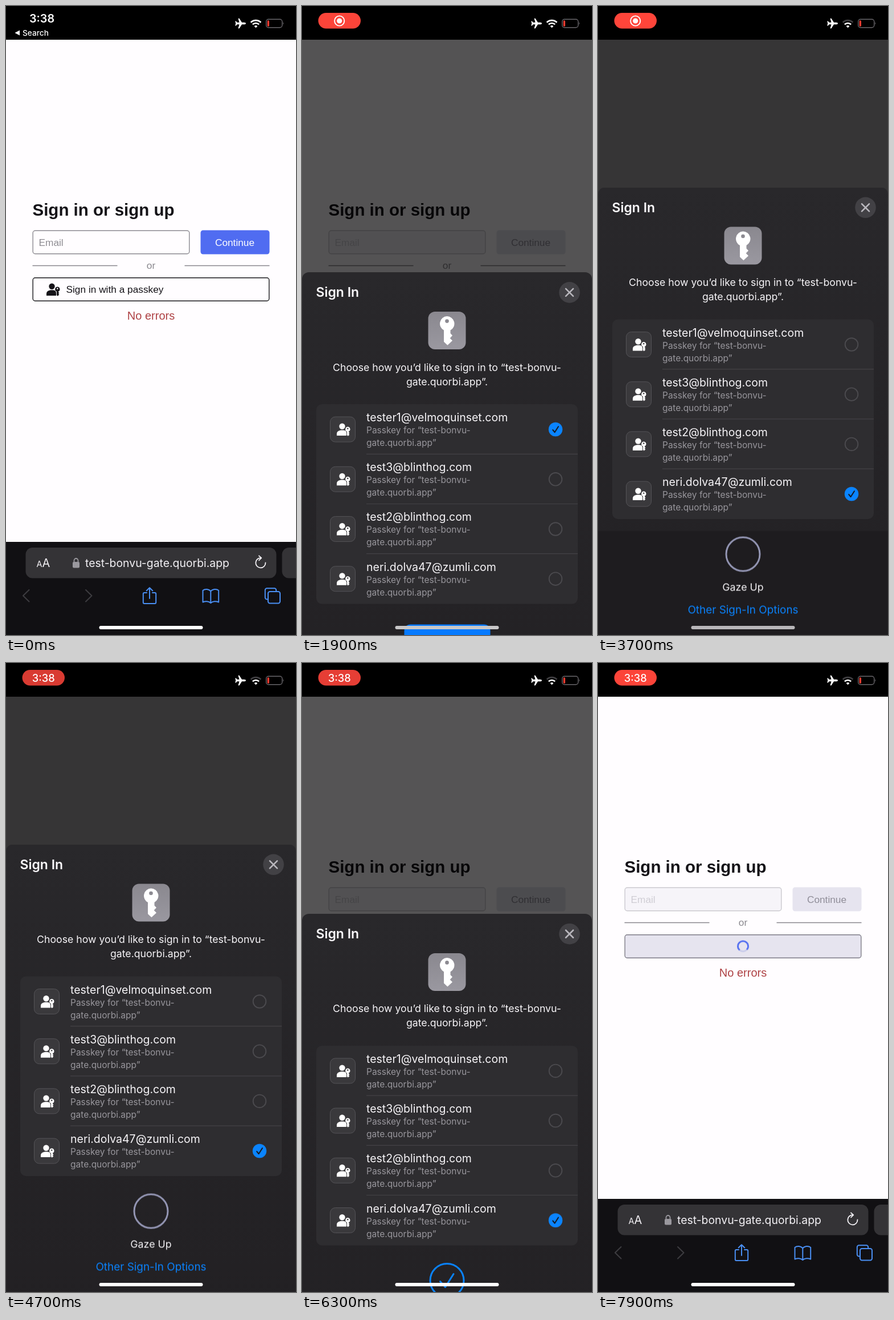
Recreate the animation shown at these times as an HTML page. Size 509 by 1101 pixels, loop 8000 ms.

```html
<!DOCTYPE html>
<html lang="en">
<head>
<meta charset="utf-8">
<title>Passkey sign-in</title>
<style>
html, body { margin: 0; width: 100%; height: 100%; overflow: hidden; background: #000; }
svg { display: block; width: 100%; height: 100%; font-family: Inter, sans-serif; }
.web { font-family: "Liberation Sans", Arial, sans-serif; }
.mid { text-anchor: middle; }
.line { fill: none; stroke-linecap: round; stroke-linejoin: round; }

/* Hard switches: .off leaves and .on arrives at the step */
.off { --a: 1; --b: 0; }
.on { --a: 0; --b: 1; }
.rec, .tap, .pick, .scan, .clock, .done { animation: 8s step-end infinite; }
.rec { animation-name: rec; }
.tap { animation-name: tap; }
.pick { animation-name: pick; }
.scan { animation-name: scan; }
.clock { animation-name: clock; }
.done { animation-name: done; }
@keyframes rec { 0% { opacity: var(--a) } 3.75%, 100% { opacity: var(--b) } }
@keyframes tap { 0% { opacity: var(--a) } 13.75%, 100% { opacity: var(--b) } }
@keyframes pick { 0% { opacity: var(--a) } 37.5%, 100% { opacity: var(--b) } }
@keyframes scan { 0% { opacity: var(--a) } 45.8%, 100% { opacity: var(--b) } }
@keyframes clock { 0% { opacity: var(--a) } 58.125%, 100% { opacity: var(--b) } }
@keyframes done { 0% { opacity: var(--a) } 62.5%, 100% { opacity: var(--b) } }

#pill { animation: pulse 2s -1.7s ease-in-out infinite; animation-delay: -.3s; }
@keyframes pulse { 0%, 100% { fill: #ff453a } 50% { fill: #d93b32 } }

#spinner { transform-origin: 254.5px 495.7px; animation: spin 8s linear infinite; }
@keyframes spin { from { transform: rotate(-16deg) } to { transform: rotate(3824deg) } }

#sheet, #dim { animation: 8s cubic-bezier(.32, .72, 0, 1) infinite; }
#sheet { animation-name: slide; }
#dim { animation-name: dim; }
@keyframes slide {
  0%, 21.875% { transform: translateY(750px) }
  28.125%, 45.79% { transform: translateY(0) }
  45.8%, 78.375% { transform: translateY(-35.5px) }
  84.625%, 100% { transform: translateY(750px) }
}
@keyframes dim {
  0%, 21.875% { opacity: 0 }
  28.125%, 78.375% { opacity: .79 }
  84.625%, 100% { opacity: 0 }
}
#panel { animation: panel 8s linear infinite; }
@keyframes panel { 0%, 45.79% { opacity: 0 } 45.8%, 46.6% { opacity: 1 } 51%, 100% { opacity: 0 } }
#tick { stroke-dasharray: 42; animation: tick 8s ease-out infinite; }
@keyframes tick { 0%, 62.5% { stroke-dashoffset: 42 } 65.6%, 100% { stroke-dashoffset: 0 } }
#home { animation: home 8s linear infinite; }
@keyframes home {
  0%, 21.875% { fill: #fff }
  27%, 45% { fill: #69676a }
  46.25% { fill: #b8b6b9 }
  50%, 100% { fill: #fff }
}
</style>
</head>
<body>
<svg viewBox="0 0 509 1101" preserveAspectRatio="none">
  <defs>
    <linearGradient id="shade" x2="0" y2="1">
      <stop stop-color="#29282b"/><stop offset="1" stop-color="#222023"/>
    </linearGradient>
    <linearGradient id="badge" x2="0" y2="1">
      <stop stop-color="#8a888f"/><stop offset="1" stop-color="#9a98a0"/>
    </linearGradient>
    <g id="user">
      <circle cx="9.5" cy="5.2" r="5.2"/>
      <path d="M0 21.5V18.5C0 14 3.5 11.8 9.5 11.8C12 11.8 14.2 12.2 15.8 13.2L17 16V21.5Z"/>
      <path fill-rule="evenodd" d="M19.3 6a4.3 4.3 0 0 1 1.7 8.2v1l1.4 1.5-1.4 1.6 1.4 1.5-2.8 2.4-1.7-1.8v-6.1A4.3 4.3 0 0 1 19.3 6zm0 1.8a1.3 1.3 0 1 0 .01 0z"/>
    </g>
    <g id="check">
      <circle r="12.2" fill="#0a84ff"/>
      <path class="line" d="M-4.8 .8L-1.4 5L5 -5" stroke="#17161a" stroke-width="2"/>
    </g>
  </defs>

  <!-- Page -->
  <rect y="59" width="509" height="879" fill="#fffdff"/>
  <g class="web">
    <text x="46.5" y="367" font-size="29.5" font-weight="700" fill="#151318">Sign in or sign up</text>
    <g font-size="17.3">
      <g class="tap off">
        <rect x="47.2" y="393.2" width="274.6" height="40.6" rx="4" fill="#fffdff" stroke="#8c8a91" stroke-width="1.4"/>
        <text x="57.5" y="420" fill="#8e8c92">Email</text>
        <rect x="341.5" y="392.5" width="121" height="42" rx="4.5" fill="#506cf1"/>
        <text class="mid" x="401.5" y="420" fill="#fff">Continue</text>
        <rect x="47.2" y="475.7" width="414.6" height="40.6" rx="4" fill="#fffdff" stroke="#1a191c" stroke-width="1.4"/>
        <use href="#user" x="71" y="485.5" fill="#151318"/>
        <text x="105.5" y="502" fill="#151318">Sign in with a passkey</text>
      </g>
      <g class="tap on">
        <rect x="47.2" y="393.2" width="274.6" height="40.6" rx="4" fill="#f6f4f9" stroke="#cbc9cf" stroke-width="1.4"/>
        <text x="57.5" y="420" fill="#cfcdd4">Email</text>
        <rect x="341.5" y="392.5" width="121" height="42" rx="4.5" fill="#e6e4ef"/>
        <text class="mid" x="401.5" y="420" fill="#8f8d98">Continue</text>
        <rect x="47.2" y="475.7" width="414.6" height="40.6" rx="4" fill="#e6e4ef" stroke="#7f7d88" stroke-width="1.4"/>
        <g id="spinner" fill="none" stroke-width="2.8">
          <circle cx="254.5" cy="495.7" r="9" stroke="#c8cbea"/>
          <circle cx="254.5" cy="495.7" r="9" stroke="#506cf1" pathLength="4" stroke-dasharray="3 1" transform="rotate(-45 254.5 495.7)"/>
        </g>
      </g>
      <path d="M46.5 454.5H195.5M313.5 454.5H462.5" stroke="#89878d" stroke-width="1.4"/>
      <text class="mid" x="254.5" y="460" fill="#8b898f">or</text>
    </g>
    <text class="mid" x="254.5" y="549" font-size="20" fill="#ae4144">No errors</text>
  </g>

  <!-- Browser bar -->
  <rect y="938" width="509" height="163" fill="#111013"/>
  <g fill="#343336">
    <rect x="34.5" y="948" width="440" height="53.5" rx="12"/>
    <rect x="484.5" y="948" width="60" height="53.5" rx="12"/>
  </g>
  <g fill="#f3f1f5">
    <text x="53.5" y="982" font-size="14.5">A</text>
    <text x="63.5" y="982" font-size="20">A</text>
    <text class="mid" x="265.5" y="981.5" font-size="19.4">test-bonvu-gate.quorbi.app</text>
  </g>
  <rect x="117" y="973" width="12" height="10.5" rx="2" fill="#9a989e"/>
  <path class="line" d="M119.5 973v-2.5a3.5 3.5 0 0 1 7 0v2.5" stroke="#9a989e" stroke-width="1.8"/>
  <g class="line" stroke-width="2">
    <path d="M448 966.2A8.6 8.6 0 1 0 455.5 974.5M444 962.3L448.3 966.2L444 970.3" stroke="#f3f1f5" stroke-width="1.8"/>
    <path d="M40.5 1022L30 1032.3L40.5 1042.5M140 1022L150.5 1032.3L140 1042.5" stroke="#3d3c40"/>
    <g stroke="#4a8ff3">
      <path d="M247 1027h-4.2a2 2 0 0 0-2 2v15a2 2 0 0 0 2 2h18.4a2 2 0 0 0 2-2v-15a2 2 0 0 0-2-2H257M252 1037V1018.5M246.7 1023.5L252 1018.3L257.3 1023.5"/>
      <path d="M359.3 1024.5C356 1020 349 1020 345.5 1023V1043.5C349.5 1041.5 356 1041.5 359.3 1045C362.6 1041.5 369 1041.5 373.2 1043.5V1023C369.6 1020 362.6 1020 359.3 1024.5V1045"/>
      <path d="M459.5 1038.5H458a3.2 3.2 0 0 1-3.2-3.2V1022.500a3.200 3.200 0 0 1 3.200-3.200H471a3.200 3.200 0 0 1 3.200 3.200V1025"/>
      <rect x="460" y="1025" width="21" height="20.500" rx="3.200"/>
    </g>
  </g>

  <rect id="dim" y="59" width="509" height="1042"/>

  <!-- Sign-in sheet -->
  <g id="sheet">
    <rect y="353" width="509" height="850" rx="12" fill="url(#shade)"/>
    <text x="24.500" y="396" font-size="23" font-weight="600" fill="#fbf9fc">Sign In</text>
    <circle cx="469.500" cy="388.300" r="18.300" fill="#424145"/>
    <path class="line" d="M463 381.800l13 13m0-13l-13 13" stroke="#b9b7bd" stroke-width="2.600"/>
    <rect x="221.500" y="422" width="66" height="66" rx="12" fill="url(#badge)"/>
    <path fill="#fff" d="M254.500 430a13 13 0 0 1 6 24.500v5.500l3.500 3.700-4.300 4.600 4.300 4.400-8.600 8-6.400-6V454.500A13 13 0 0 1 254.500 430z"/>
    <circle cx="254.500" cy="438.500" r="3.300" fill="#8c8a91"/>
    <g class="mid" font-size="17.700" fill="#f7f5f8">
      <text x="254.500" y="525.500">Choose how you’d like to sign in to “test-bonvu-</text>
      <text x="254.500" y="550.500">gate.quorbi.app”.</text>
    </g>
    <rect x="25" y="584" width="459" height="349.500" rx="10" fill="#2e2d30"/>
    <g id="rows"></g>

    <g class="scan off">
      <rect x="179.500" y="969.500" width="151" height="54" rx="11" fill="#057aff"/>
      <text class="mid" x="254.500" y="1003" font-size="18.900" font-weight="600" fill="#fff">Continue</text>
      <text class="mid" x="254.500" y="1059.500" font-size="18.900" fill="#0a84ff">Other Sign-In Options</text>
    </g>
    <g class="scan on">
      <rect id="panel" y="954.500" width="509" height="260" fill="#1e1c1f"/>
      <g class="mid" font-size="17.800" fill="#f7f5f8">
        <g class="done off">
          <circle class="line" cx="254.500" cy="995" r="29.500" stroke="#9496b4" stroke-width="3"/>
          <text x="254.500" y="1058.500">Gaze Up</text>
        </g>
        <g class="done on">
          <circle class="line" cx="254.500" cy="995" r="29.500" stroke="#0a84ff" stroke-width="3"/>
          <path id="tick" class="line" d="M242.500 996.500L251.500 1006.500L266 983.500" stroke="#0a84ff" stroke-width="3"/>
          <text x="254.500" y="1058.500">Done</text>
        </g>
        <text x="254.500" y="1098.500" font-size="18.900" fill="#0a84ff">Other Sign-In Options</text>
      </g>
    </g>
  </g>

  <rect id="home" x="163.500" y="1085" width="182" height="6" rx="3"/>

  <!-- Status bar -->
  <rect width="509" height="59"/>
  <g class="rec off" fill="#fff">
    <text class="mid" x="63" y="29" font-size="19.800" font-weight="600">3:38</text>
    <path d="M15.500 47L24 42.500V51.500Z"/>
    <text x="29" y="52" font-size="13.700" font-weight="500">Search</text>
  </g>
  <g class="rec on">
    <rect id="pill" x="28.500" y="12" width="74.500" height="27.500" rx="13.700"/>
    <g class="clock off" fill="#fff">
      <circle class="line" cx="65.700" cy="26" r="8.600" stroke="#fff" stroke-width="1.900"/>
      <circle cx="65.700" cy="26" r="4.600"/>
    </g>
    <text class="clock on mid" x="65.700" y="32.700" font-size="18.300" font-weight="500" fill="#fff">3:38</text>
  </g>
  <path fill="#fff" d="M421 30.500c0 1-1.500 1.800-3 1.800h-4l-4.500 7h-2l2-7h-4l-1.700 2.300h-1.500l1-4.100-1-4.100h1.500l1.700 2.300h4l-2-7h2l4.500 7h4c1.500 0 3 .8 3 1.800z"/>
  <g fill="none" stroke="#fff" stroke-width="2.700">
    <path d="M429.700 28.700a12.500 12.500 0 0 1 17.600 0" stroke="#3f3e41"/>
    <path class="pick off" d="M429.700 28.700a12.500 12.500 0 0 1 17.600 0"/>
    <path d="M432.900 32.300a8 8 0 0 1 11.200 0"/>
    <path d="M438.500 38.300l-2.900-3a4.200 4.200 0 0 1 5.800 0z" fill="#fff" stroke="none"/>
  </g>
  <rect x="456.700" y="23.200" width="28" height="14.600" rx="4" fill="none" stroke="#68666a" stroke-width="1.400"/>
  <rect x="458.700" y="25.200" width="3.300" height="10.600" rx="1.500" fill="#ff3b30"/>
  <path d="M486.300 28.300q2.200 2.200 0 4.400z" fill="#68666a"/>
</svg>
<script>
const accounts = [
  'tester1@velmoquinset.com',
  'test3@blinthog.com',
  'test2@blinthog.com',
  'neri.dolva47@zumli.com'
];
const last = accounts.length - 1;

const row = (name, i) => {
  const mark = i === 0 ? 'off' : i === last ? 'on' : '';
  return `<g transform="translate(0 ${584 + i * 87.2})">
    <rect x="49.500" y="22" width="44" height="44" rx="9" fill="#3a393c" stroke="#545357"/>
    <use href="#user" transform="translate(61 33.500)" fill="#fff"/>
    <text x="113" y="30" font-size="19.500" fill="#f7f5f8">${name}</text>
    <g font-size="15.500" fill="#98969c">
      <text x="113" y="51">Passkey for “test-bonvu-</text>
      <text x="113" y="73">gate.quorbi.app”</text>
    </g>
    <circle cx="445" cy="44" r="11.300" fill="none" stroke="#4b4a4e" stroke-width="1.900"/>
    ${mark && `<g class="pick ${mark}"><use href="#check" x="445" y="44"/></g>`}
    ${i < last ? '<path d="M113 87.200H484" stroke="#434246" stroke-width="1.200"/>' : ''}
  </g>`;
};
document.getElementById('rows').innerHTML = accounts.map(row).join('');
</script>
</body>
</html>
```
